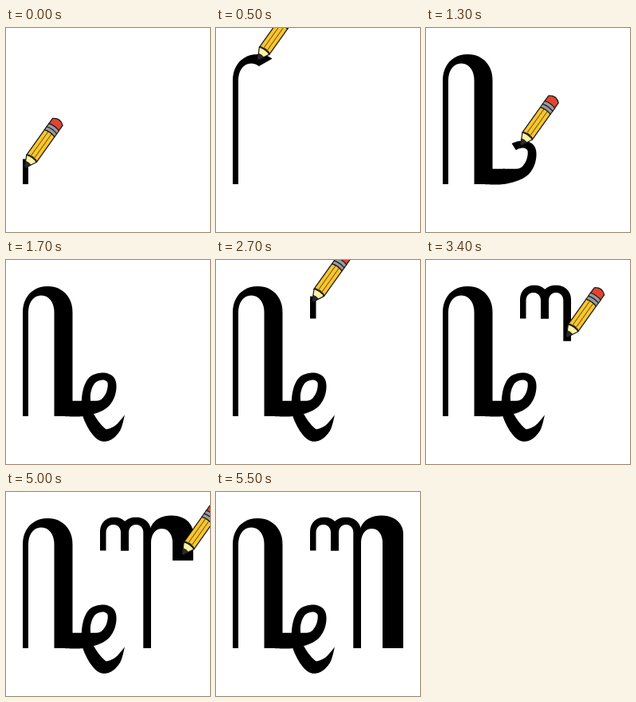
An HTML page with a canvas for the animation above (7.5 s loop, 256 by 256 pixels).

```html
<!DOCTYPE html>
<html lang="en">
<head>
<meta charset="utf-8">
<title>Pencil lettering</title>
<style>
  html, body { margin: 0; width: 100%; height: 100%; overflow: hidden; background: #fff; }
  canvas { display: block; width: 256px; height: 256px; }
</style>
</head>
<body>
<canvas id="stage" width="256" height="256"></canvas>
<script>
const ctx = document.getElementById('stage').getContext('2d');
const LOOP = 7500, STEP = 100, DETAIL = 24;

const lerp = (a, b, t) => a + (b - a) * t;
const mix = (p, q, t) => p.map((v, i) => lerp(v, q[i], t));
const clamp = v => Math.max(0, Math.min(1, v));
const soften = v => Math.sign(v) * Math.abs(v) ** 0.93;

// Pieces map t in 0..1 to the two edges of a stroke: [leftX, leftY, rightX, rightY].
const stem = (left, right, y0, y1) => t => {
  const y = lerp(y0, y1, t);
  return [left, y, right, y];
};

function halfOval({ from, to, spring, top }, t) {
  const a = Math.PI * t;
  return [
    (from + to) / 2 - (to - from) / 2 * soften(Math.cos(a)),
    spring - (spring - top) * soften(Math.sin(a))
  ];
}
const arch = (outer, inner) => t => [...halfOval(outer, t), ...halfOval(inner, t)];

// Smooth brush line through knots of [x, y, width].
function brush(knots) {
  const last = knots.length - 1;
  const at = s => {
    const i = Math.min(Math.floor(s), last - 1), t = s - i;
    const [a, b, c, d] = [-1, 0, 1, 2].map(k => knots[Math.max(0, Math.min(last, i + k))]);
    return b.map((v, k) => v + t / 2 * (c[k] - a[k]
      + t * (2 * a[k] - 5 * v + 4 * c[k] - d[k] + t * (3 * (v - c[k]) + d[k] - a[k]))));
  };
  return knots.slice(1).map((_, i) => t => {
    const s = i + t;
    const [x, y, w] = at(s), p = at(Math.max(0, s - 0.01)), q = at(Math.min(last, s + 0.01));
    const dx = q[0] - p[0], dy = q[1] - p[1], k = w / 2 / Math.hypot(dx, dy);
    return [x + dy * k, y - dx * k, x - dy * k, y + dx * k];
  });
}

const middle = e => [(e[0] + e[2]) / 2, (e[1] + e[3]) / 2];

// A stroke is drawn at even speed; lead is how far the ink runs past the pencil.
function stroke(start, end, lead, pieces) {
  const edges = [], marks = [];
  let length = 0, prev;
  for (const piece of pieces) {
    for (let i = 0; i <= DETAIL; i++) {
      const e = piece(i / DETAIL), m = middle(e);
      if (prev) length += Math.hypot(m[0] - prev[0], m[1] - prev[1]);
      edges.push(e);
      marks.push(length);
      prev = m;
    }
  }
  return { start, end, lead, edges, marks, length };
}

const strokes = [
  stroke(-70, 1038, 10, [
    stem(21, 28, 196, 66),
    arch({ from: 21, to: 83.5, spring: 66, top: 33 }, { from: 28, to: 60.5, spring: 66, top: 44.5 }),
    stem(83.5, 60.5, 66, 196)
  ]),
  stroke(1038, 1640, 10, brush([
    [70, 186.3, 19.4], [97, 186.3, 19.4], [119, 182.5, 13.5], [129, 173, 12], [133, 160, 11],
    [131, 150, 10], [121, 146, 9], [107.5, 151.5, 10], [100.7, 170, 10.5],
    [103.8, 196, 14], [121, 219, 16.5], [138, 213, 10], [149, 194.5, 0]
  ])),
  stroke(2619, 2959, 6, [
    stem(118, 125.5, 73.5, 50),
    arch({ from: 118, to: 154, spring: 50, top: 31.7 }, { from: 125.5, to: 144, spring: 51, top: 41 }),
    stem(154, 144, 50, 73.5)
  ]),
  stroke(2959, 3783, 6, [
    stem(144, 154, 73.5, 50),
    arch({ from: 144, to: 182, spring: 50, top: 31.7 }, { from: 154, to: 172.3, spring: 51, top: 41 }),
    stem(182, 172.3, 50, 196)
  ]),
  stroke(4705, 5405, 8, [
    arch({ from: 180, to: 235, spring: 53, top: 29.5 }, { from: 182, to: 209, spring: 64, top: 46 }),
    stem(235, 209, 58, 196)
  ])
];

function edgeAt({ edges, marks, length }, dist) {
  if (dist >= length) return edges[edges.length - 1];
  const i = marks.findIndex(m => m > dist);
  return mix(edges[i - 1], edges[i], (dist - marks[i - 1]) / (marks[i] - marks[i - 1]));
}

function drawStroke(s, dist) {
  const shown = s.edges.filter((_, i) => s.marks[i] < dist);
  shown.push(edgeAt(s, dist));
  ctx.beginPath();
  for (const e of shown) ctx.lineTo(e[0], e[1]);
  for (const e of shown.reverse()) ctx.lineTo(e[2], e[3]);
  ctx.fill();
}

function shape(path, fill, line) {
  const p = new Path2D(path);
  if (fill) { ctx.fillStyle = fill; ctx.fill(p); }
  if (line) { ctx.lineWidth = line; ctx.stroke(p); }
}

// The pencil lies along +x with its point at the origin.
function drawPencil(x, y) {
  ctx.save();
  ctx.translate(x, y);
  ctx.rotate(Math.atan2(-0.815, 0.58));
  ctx.lineJoin = ctx.lineCap = 'round';
  ctx.strokeStyle = '#1a1a1a';
  shape('M0 -1L13 -7.7Q16 0 13 7.7L0 1Z', '#fdf3a4', 1.2);
  shape('M0 -1L6 -4Q7.5 0 6 4L0 1Z', '#2b2b2b', 0.8);
  shape('M13 -7.7H52Q54.5 0 52 7.7H13Q16 5 14.5 2.6Q17 0 14.5 -2.6Q16 -5 13 -7.7Z', '#fdc52c', 1.3);
  shape('M14.5 -2.6H53M14.5 2.6H53', null, 0.7);
  shape('M61 -7.7H69.5Q76 0 69.5 7.7H61Z', '#e2452f', 1.3);
  shape('M52 -7.8H61.5Q64 0 61.5 7.8H52Q54.5 0 52 -7.8Z', '#9a9a9e', 1.2);
  shape('M56.7 -7.8Q59.2 0 56.7 7.8', null, 1.2);
  ctx.restore();
}

function render(time) {
  ctx.fillStyle = '#fff';
  ctx.fillRect(0, 0, 256, 256);
  ctx.fillStyle = '#000';
  let pen;
  for (const s of strokes) {
    if (time < s.start) break;
    const dist = s.length * clamp((time - s.start) / (s.end - s.start));
    drawStroke(s, dist + s.lead);
    if (time < s.end) pen = middle(edgeAt(s, dist));
  }
  if (pen) drawPencil(...pen);
}

const began = performance.now();
function tick() {
  const time = (performance.now() - began) % LOOP;
  render(Math.floor(time / STEP) * STEP);
  requestAnimationFrame(tick);
}
tick();
</script>
</body>
</html>
```
